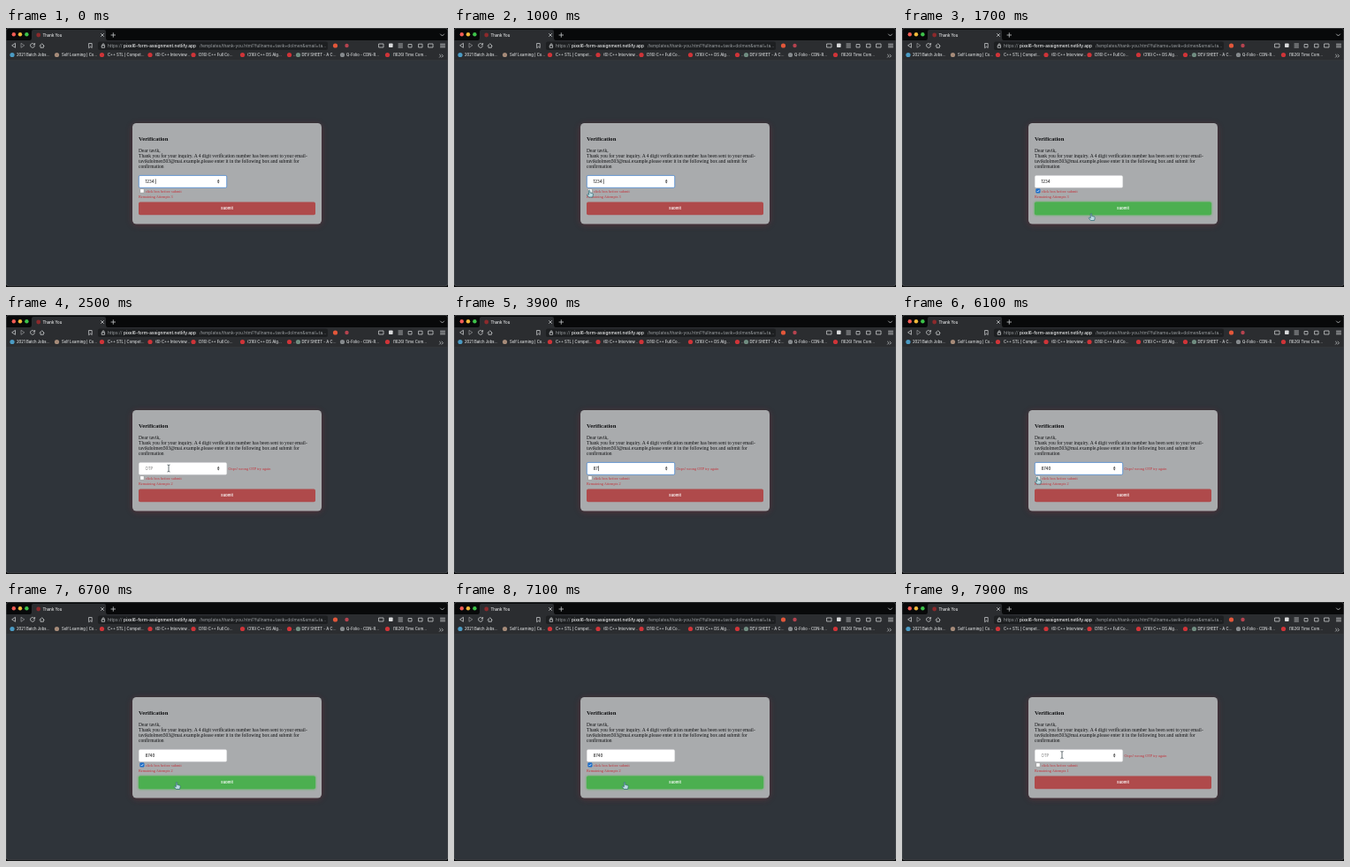
Animation of 500x294 px, one loop 8 s. Source, as an HTML page:

```html
<!DOCTYPE html>
<html lang="en">
<head>
<meta charset="utf-8">
<title>Thank You</title>
<style>
html, body { margin: 0; width: 100%; height: 100%; overflow: hidden; background: #000; }
svg { display: block; width: 500px; height: 294px; font-family: Inter, Roboto, sans-serif; }
#stage { filter: blur(.3px); }
text { white-space: pre; }
.serif { font: 5.54px "Liberation Serif", serif; fill: #101113; }
.note { font: 4.3px "Liberation Serif", serif; fill: #c3323a; }
.line { fill: none; stroke: #c6c8ca; stroke-width: .8; stroke-linecap: round; stroke-linejoin: round; }
</style>
</head>
<body>
<svg viewBox="0 0 500 294">
  <defs>
    <filter id="glow" x="-20%" y="-40%" width="140%" height="180%"><feGaussianBlur stdDeviation="3.5"/></filter>
    <filter id="halo" x="-10%" y="-60%" width="120%" height="220%"><feGaussianBlur stdDeviation="1.3"/></filter>
  </defs>
  <g id="stage">

  <!-- browser window -->
  <rect width="500" height="294" fill="#08090a"/>
  <rect y="14" width="500" height="278.6" rx="2.5" fill="#2f343a"/>
  <path d="M0 14H27Q29 14 29 11V4Q29 2 31 2H111Q113 2 113 4V11Q113 14 115 14H500V37H0Z" fill="#2b2d30"/>
  <rect x="104" y="15.5" width="260" height="9.5" rx="2" fill="#1d1f21"/>
  <rect y="36.5" width="500" height=".6" fill="#3b3e42"/>
  <rect x=".2" y=".2" width="499.600" height="292.600" rx="3" fill="none" stroke="#55585b" stroke-width=".7"/>
  <circle cx="8.800" cy="7.200" r="2.200" fill="#f25c54"/>
  <circle cx="16" cy="7.200" r="2.200" fill="#f0b93a"/>
  <circle cx="23.400" cy="7.200" r="2.200" fill="#3dc24a"/>
  <circle cx="36.700" cy="8" r="2.400" fill="#8c2a2c"/>
  <text x="41.500" y="9.700" font-size="4.300" font-weight="500" fill="#e6e7e8">Thank You</text>
  <g class="line">
    <path d="M107.500 6.500l3 3m0-3l-3 3M119 8h4.600M121.300 5.700v4.600M491.500 7l2 2 2-2"/>
    <path d="M10.500 17.700v4.600L7 20z"/>
    <path d="M17 17.700v4.600l3.500-2.300z" opacity=".6"/>
    <path d="M32.300 18.600a2.500 2.500 0 1 0 .2 2m.1-3.200v1.700h-1.700"/>
    <path d="M38.200 20.200l2.500-2.500 2.500 2.500M39 20v2.300h3.400V20"/>
    <path d="M94 17.500h3.200v5l-1.600-1.300L94 22.500z"/>
    <path d="M108.600 19.800h3v2.500h-3zM109.200 19.600v-1a.9 .9 0 0 1 1.800 0v1"/>
    <path d="M490.500 30.200l1.500 1.500-1.500 1.500m2.500-3l1.500 1.500-1.500 1.500"/>
    <path d="M422 18h5v4h-5zM444 18h4.500M444 20h4.500M444 22h4.500M455.500 18.500h3.500v3.500h-3.500zM467 18.200h4v3.800h-4zM478 18h5v4h-5z"/>
    <path d="M491.500 18.200h5M491.500 20h5M491.500 21.800h5"/>
  </g>
  <rect x="433" y="17.500" width="4.600" height="4.600" rx=".8" fill="#d9dadb"/>
  <g font-size="4.850" fill="#9da1a4">
    <text x="115" y="21.700">https://</text>
    <text x="133" y="21.700" font-weight="500" fill="#f0f1f2">pixel6-form-assignment.netlify.app</text>
    <text x="219" y="21.700">/templates/thank-you.html?fullname=tavik+dolmen&amp;email=ta...</text>
  </g>
  <circle cx="372.500" cy="20" r="2.600" fill="#e2573a"/>
  <circle cx="385.500" cy="20" r="2.200" fill="#b5434f"/>
  <g id="bookmarks" font-size="4.250" font-weight="500" fill="#dcdedf"></g>

  <!-- verification card -->
  <rect x="143" y="109.500" width="214" height="114" rx="5" fill="#7c2830" opacity=".5" filter="url(#glow)"/>
  <rect x="143" y="108" width="214" height="114.500" rx="4.500" fill="#a9abad"/>
  <g class="serif">
    <text x="150" y="127.700" style="font-size:6.650px;font-weight:bold">Verification</text>
    <text x="150" y="140.500">Dear tavik,</text>
    <text x="150" y="147">Thank you for your inquiry. A 4 digit verification number has been sent to your email-</text>
    <text x="150" y="153.200">tavikdolmen503@mai.example,please enter it in the following box and submit for</text>
    <text x="150" y="159.400">confirmation</text>
  </g>
  <rect id="field" x="150.300" y="167.400" width="99.400" height="13.900" rx="1.500" fill="#fff"/>
  <text id="code" x="157.500" y="175.900" font-size="4.400"></text>
  <rect id="caret" y="171.300" width=".6" height="5.800" fill="#111"/>
  <path id="spinner" d="M238.900 173.700l1.300-1.900 1.300 1.900zM238.900 174.600l1.300 1.900 1.300-1.900z" fill="#444"/>
  <text id="error" class="note" x="251.500" y="176.200">Oops! wrong OTP try again</text>
  <rect id="box" x="151.600" y="182.600" width="4.600" height="4.600" rx=".8" stroke-width=".5"/>
  <path id="tick" d="M152.600 185l1 1 1.700-2.100" fill="none" stroke="#fff" stroke-width=".7"/>
  <text class="note" x="158" y="187">click box before submit</text>
  <text id="attempts" class="note" x="150" y="193.200"></text>
  <rect id="halo-shape" x="149.500" y="197.300" width="201" height="15.500" rx="2" fill="#55b957" opacity=".8" filter="url(#halo)"/>
  <rect id="button" x="150" y="197.600" width="200" height="14.700" rx="1.800"/>
  <text x="250" y="206.400" font-size="4.100" font-weight="600" fill="#fff" text-anchor="middle">Submit</text>

  <!-- pointer -->
  <g id="pointer" stroke-linejoin="round">
    <path id="beam" d="M-1.500 -4Q0 -4 0 -3Q0 -4 1.500 -4M0 -3V3M-1.500 4Q0 4 0 3Q0 4 1.500 4" fill="none" stroke="#3d4a50" stroke-width=".8"/>
    <path id="hand" d="M-.7 .4Q0 -.6 .7 .4V3L3.200 3.500Q4.300 3.800 4.200 5L3.600 8H-.6L-2.800 5.200Q-2.500 4 -.7 5.200Z" fill="#b9d9e0" stroke="#2f6670" stroke-width=".7"/>
    <path id="arrow" d="M0 0V7L1.600 5.600 2.700 8 3.800 7.500 2.700 5.200H5Z" fill="#111" stroke="#fff" stroke-width=".5"/>
  </g>
  </g>
</svg>
<script>
const LOOP = 8000;
const $ = id => document.getElementById(id);
const show = (id, on) => $(id).setAttribute('visibility', on ? 'visible' : 'hidden');
const set = (id, attrs) => { for (const k in attrs) $(id).setAttribute(k, attrs[k]); };

// Icon centre, label start, icon colour, label
const red = '#cf3438';
const bookmarks = [
  [7, 12, '#4b9bc4', '2021 Batch Jobs...'],
  [57.5, 63, '#a58a78', 'Self Learning | Co...'],
  [108.5, 115, red, 'C++ STL | Compet...'],
  [163, 169, red, '(6) C++ Interview...'],
  [212, 217.5, red, '(316) C++ Full Co...'],
  [267.5, 273, red, '(316) C++ DS Alg...'],
  [320.5, 325, red, '...'],
  [330.5, 334.5, '#6f8c80', 'DEV SHEET - A C...'],
  [380.5, 385, '#85898c', 'Q-Folio - CDN-R...'],
  [431.5, 437.5, red, '(1626) Time Com...'],
];
$('bookmarks').innerHTML = bookmarks.map(([icon, x, color, label]) =>
  `<circle cx="${icon}" cy="30.500" r="2.600" fill="${color}"/><text x="${x}" y="32">${label}</text>`
).join('');

// Pointer stops: time, x, y
const path = [
  [300, 184, 174], [950, 153.2, 184], [1450, 153.2, 184], [1690, 214, 210.5], [2050, 214, 210.5],
  [2400, 184, 174], [5250, 184, 174], [6000, 153.2, 184], [6450, 153.2, 184],
  [6680, 193, 204.5], [7180, 193, 204.5], [7480, 181, 173.5], [LOOP, 181, 173.5],
];
const keys = [3450, 3800, 4300, 4600];
const between = (t, a, b) => t >= a && t < b;

function pointerAt(t) {
  const i = path.findIndex(p => p[0] > t);
  if (i < 1) return path[0].slice(1);
  const [t0, x0, y0] = path[i - 1], [t1, x1, y1] = path[i];
  const u = (t - t0) / (t1 - t0), e = u * u * (3 - 2 * u);
  return [x0 + (x1 - x0) * e, y0 + (y1 - y0) * e];
}

function render(t) {
  const checked = between(t, 1080, 2100) || between(t, 6150, 7220);
  const focused = t < 1080 || between(t, 2950, 6150);
  const typed = keys.filter(k => t >= k).length;
  const value = t < 2100 ? '1234' : t < 7220 ? '8740'.slice(0, typed) : '';
  const lastKey = t < 2100 ? 0 : typed ? keys[typed - 1] : 2950;
  const visible = between(t, 300, 3400) || t >= 5250;
  const [x, y] = pointerAt(t);
  const overField = visible && between(x, 150, 250) && between(y, 167, 182);
  const overButton = between(y, 197, 213);
  const overBox = x < 160 && between(y, 182, 188);

  $('code').textContent = value || 'OTP';
  set('code', { fill: value ? '#222' : '#777', 'font-weight': value ? 500 : 400 });
  set('field', { stroke: focused ? '#4f8bd4' : '#d5d7d8', 'stroke-width': focused ? .8 : .3 });
  set('caret', { x: 157.7 + value.length * 2.78 });
  show('caret', focused && (t - lastKey) % 1000 < 500);
  show('spinner', focused || overField);
  show('error', between(t, 2100, 6150) || t >= 7220);
  set('box', { fill: checked ? '#1f6fc9' : '#fff', stroke: checked ? '#1f6fc9' : '#777' });
  show('tick', checked);
  $('attempts').textContent = 'Remaining Attempts ' + (t < 2100 ? 3 : t < 7220 ? 2 : 1);
  set('button', { fill: checked ? '#4caf50' : '#af4a4b' });
  show('halo-shape', checked);

  set('pointer', { transform: `translate(${x} ${y})` });
  show('beam', visible && overField);
  show('hand', visible && (overButton || overBox));
  show('arrow', visible && !overField && !overButton && !overBox);
}

const start = performance.now();
function tick() {
  render((performance.now() - start) % LOOP);
  requestAnimationFrame(tick);
}
tick();
</script>
</body>
</html>
```
